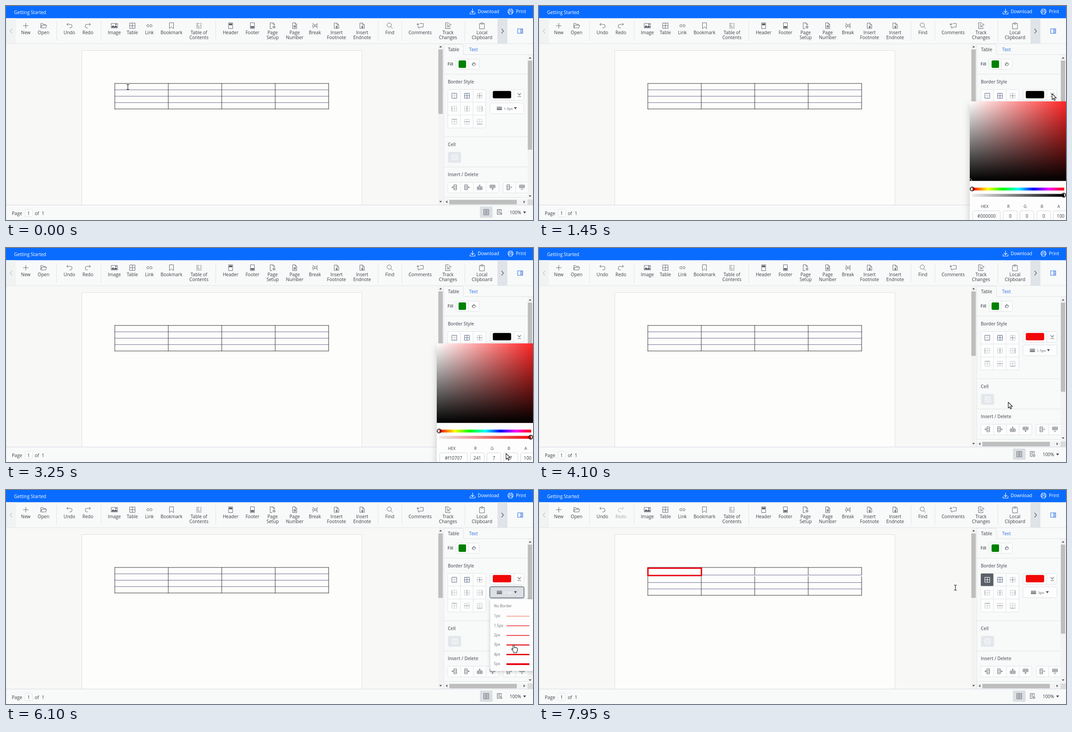
Write an HTML page that moves like this. It is 1172 px wide and 478 px high and loops after 8000 ms.

```html
<!DOCTYPE html>
<html lang="en">
<head>
<meta charset="utf-8">
<title>Table border editing</title>
<style>
  html, body { margin: 0; width: 100%; height: 100%; overflow: hidden; background: #f8f9f9; }
  svg { display: block; width: 1172px; height: 478px; }
  text { font-family: "Open Sans", "Noto Sans", sans-serif; font-size: 10.1px; fill: #3a3f45; white-space: pre; }
  .icon { fill: none; stroke: #5a6068; stroke-width: .95; }
  .solid { fill: #5a6068; stroke: none; }
  .bar { fill: #fff; }
  .head { font-weight: 600; fill: #666c72; font-size: 9.9px; }
  .box { fill: #fdfdfd; stroke: #dfe3e7; }
  .rule { stroke: #dfe3e6; fill: none; }
  .small { font-size: 8.3px; fill: #6f757b; }
</style>
</head>
<body>
<svg id="stage" viewBox="0 0 1172 478" xmlns="http://www.w3.org/2000/svg"></svg>
<script>
const LOOP = 8000, STEP = 50;
const stage = document.getElementById('stage');

function el(parent, name, attrs = {}, content) {
  const node = document.createElementNS('http://www.w3.org/2000/svg', name);
  for (const key in attrs) node.setAttribute(key, attrs[key]);
  if (content !== undefined) node.textContent = content;
  parent.appendChild(node);
  return node;
}
const group = (parent, attrs) => el(parent, 'g', attrs);
const rect = (parent, x, y, width, height, attrs) => el(parent, 'rect', { x, y, width, height, ...attrs });
const path = (parent, d, attrs) => el(parent, 'path', { d, ...attrs });
const label = (parent, x, y, text, attrs) => el(parent, 'text', { x, y, ...attrs }, text);
const centered = (parent, x, y, text, attrs) => label(parent, x, y, text, { 'text-anchor': 'middle', ...attrs });
const rule = (parent, d, attrs) => path(parent, d, { class: 'rule', ...attrs });

function icon(parent, x, y, d, solid) {
  const g = group(parent, { transform: `translate(${x} ${y})` });
  if (d) path(g, d, { class: 'icon' });
  if (solid) path(g, solid, { class: 'solid' });
  return g;
}
function gradient(id, colors, attrs) {
  const g = el(defs, 'linearGradient', { id, ...attrs });
  return colors.map(([color, alpha], i) => el(g, 'stop', {
    offset: i / (colors.length - 1), 'stop-color': color, 'stop-opacity': alpha }));
}
const show = (node, on) => node.setAttribute('display', on ? 'inline' : 'none');

const defs = el(stage, 'defs');

// Title bar
rect(stage, 0, 0, 1172, 478, { fill: '#f8f9f9' });
rect(stage, 0, 0, 1172, 27.3, { fill: '#0a6cfe' });
label(stage, 18, 17.5, 'Getting Started', { class: 'bar' });
label(stage, 1049, 16, 'Download', { class: 'bar' });
label(stage, 1134, 16, 'Print', { class: 'bar' });
path(stage, 'M1037.5 6V15M1034 11.5L1037.5 15L1041 11.5M1032 14V18H1043V14M1118.5 10V7H1125.5V10M1118.5 15H1116.5V10H1127.5V15H1125.5M1118.5 13H1125.5V18H1118.5Z',
  { fill: 'none', stroke: '#fff', 'stroke-width': 1.1 });

// Toolbar
const page = 'M1-6.5H-4.5V6.5H4.5V-3ZM1-6.5V-3H4.5';
const sheet = 'M-4.5-6.5H4.5V6.5H-4.5Z';
const note = 'M-2 6H-5V-6H1L5-2V6H3M1-6V-2H5M-1 1H2V6H-1ZM.5 1V6';
const tools = [
  [44, 'New', 'M0-6V6M-6 0H6'],
  [83.5, 'Open', 'M-6 5V-5H-2L-.5-3H4V-1M-6 5L-4-1H7L5 5Z'],
  [141, 'Undo', 'M-3-6L-6-3L-3 0M-6-3H2A4 4 0 0 1 2 5H0'],
  [182, 'Redo', 'M3-6L6-3L3 0M6-3H-2A4 4 0 0 0-2 5H0'],
  [241, 'Image', 'M-7-5H7V5H-7Z', 'M-6 4V2L-3-1L0 2L3-1L6 2V4ZM2-4H5V-2H2Z'],
  [281, 'Table', 'M-6-6H6V6H-6ZM0-6V6M-6 0H6'],
  [319, 'Link', 'M-1-2.5H-3.5A2.5 2.5 0 0 0-3.5 2.5H-1M1-2.5H3.5A2.5 2.5 0 0 1 3.5 2.5H1M-3 0H3'],
  [368, 'Bookmark', 'M-4.5-6.5H4.5V6.5L0 2.5L-4.5 6.5Z'],
  [429, 'Table of|Contents', 'M-6-5H1M3-5H6M-6-1.5H-1M3-1.5H6M-6 1.5H1M3 1.5H6M-6 5H6'],
  [499.5, 'Header', sheet, 'M-3.5-5H3.5V-1H-3.5Z'],
  [548, 'Footer', sheet, 'M-3.5 1H3.5V5H-3.5Z'],
  [593, 'Page|Setup', 'M1-6.5H-5.5V6.5H-1M1-6.5V-3H4.5M1-6.5L4.5-3V-1M.5 3A2.5 2.5 0 1 0 5.5 3A2.5 2.5 0 1 0 .5 3', 'M2 3A1 1 0 1 0 4 3A1 1 0 1 0 2 3'],
  [642, 'Page|Number', page + 'M-1-1V4.5M1.5-1V4.5M-2.5.5H3M-2.5 3H3'],
  [687, 'Break', 'M-4-6V-3L-1-2H5V-6M-4 6V2H5V6M-6-1L-4 0L-6 1M-2 0H1M3 0H6'],
  [735, 'Insert|Footnote', note],
  [792, 'Insert|Endnote', note],
  [853.5, 'Find', 'M3.5-1.5A4.7 4.7 0 1 1-5.9-1.5A4.7 4.7 0 1 1 3.5-1.5M2 2L6.5 6.5'],
  [921, 'Comments', 'M-1-5H7V3H0L-3 6V3H-5V1M-5-6V0M-8-3H-2'],
  [983, 'Track|Changes', 'M1-6.5H-5.5V6.5H4.5V4M1-6.5L4-3.5M-3-3H0M-3 0H0M-3 3H-1M0 3L1 0L5-4L7-2L3 2Z'],
  [1058.5, 'Local|Clipboard', 'M-2-5H-5.5V7H5.5V-5H2M-2-6.5H2V-3.5H-2Z']
];
rect(stage, 0, 27.3, 22, 56.7, { fill: '#f1f3f3' });
rect(stage, 1093, 27.3, 22, 56.7, { fill: '#dfe4e9' });
let redo;
for (const [x, name, d, solid] of tools) {
  const g = group(stage);
  icon(g, x, 44, d, solid);
  name.split('|').forEach((line, i) => centered(g, x, 62.6 + i * 11.8, line));
  if (name === 'Redo') redo = g;
}
for (const x of [112.5, 211.5, 466.5, 827.5, 880.5, 1020.5]) rule(stage, `M${x} 34V78`);
path(stage, 'M13.5 51L9 56L13.5 61', { fill: 'none', stroke: '#bfc4c9', 'stroke-width': 1.2 });
path(stage, 'M1102 51L1106.5 56L1102 61', { fill: 'none', stroke: '#555b61', 'stroke-width': 1.2 });
path(stage, 'M1138 51H1149V61H1138ZM1145 51V61', { fill: 'none', stroke: '#2f72e4', 'stroke-width': 1.1 });
path(stage, 'M1145 51H1149V61H1145Z', { fill: '#2f72e4', 'fill-opacity': .3 });

// Document
rect(stage, 0, 84, 961, 360, { fill: '#f8f8f7' });
rule(stage, 'M0 84H1172M.5 28V478');
path(stage, 'M168.5 444V99.5H791.5V444', { fill: '#fdfdfc', stroke: '#dcdee0' });

const inner = '#66668c', dark = '#303030';
function grid(rows, spans) {
  const g = group(stage);
  rows.forEach((y, i) => path(g, `M241.5 ${y}H718`, { stroke: i && i < 4 ? inner : dark }));
  for (let i = 0; i < 5; i++)
    for (const [a, b] of spans) path(g, `M${242 + i * 118.9} ${a}V${b}`, { stroke: dark });
  return g;
}
const plainTable = grid([0, 1, 2, 3, 4].map(i => 173 + i * 14.25), [[172.5, 230.5]]);
const redTable = grid([173, 190, 206.7, 221, 235.2], [[172.5, 190], [193, 235.5]]);
rect(redTable, 242.2, 174.5, 119, 16.5, { fill: '#fdfdfc', stroke: '#e8000b', 'stroke-width': 3 });

// Scroll bars
const arrow = (x, y, d) => path(stage, d, { transform: `translate(${x} ${y})`, fill: '#555' });
const up = 'M-3 1.5L0-2L3 1.5Z', down = 'M-3-1.5L0 2L3-1.5Z';
rect(stage, 961, 85, 11, 359, { fill: '#f3f3f4' });
rect(stage, 961.5, 97, 10, 144, { fill: '#bebebe' });
arrow(966.5, 91, up);
arrow(966.5, 437, down);

// Properties panel
rect(stage, 973, 85, 199, 359, { fill: '#f8f9f9' });
rule(stage, 'M973.5 85V444M1017 108.5H1172M974 85.5H1014Q1017.5 85.5 1017.5 89V108');
label(stage, 983, 100.5, 'Table');
label(stage, 1030, 101, 'Text', { style: 'fill:#2a6fe0' });
label(stage, 982, 132.5, 'Fill', { class: 'head', style: 'font-size:9.2px;fill:#444a50' });
rect(stage, 1000.5, 118.5, 52, 23, { class: 'box', rx: 3 });
rule(stage, 'M1028.5 119V141M974 152H1160M974 292H1160M974 359.5H1160M974 427.5H1160');
rect(stage, 1006.5, 121.6, 16.6, 16.6, { rx: 2.5, fill: '#008000' });
icon(stage, 1041, 130, 'M-4-1L0-4L4 0L0 4L-3 2ZM-4-1H3M-4-1V3M-1-3V-5');
label(stage, 982.5, 172.7, 'Border Style', { class: 'head' });
label(stage, 982.5, 312.7, 'Cell', { class: 'head' });
label(stage, 982.5, 380, 'Insert / Delete', { class: 'head' });

rect(stage, 982.5, 186.5, 84.5, 86, { class: 'box', rx: 3 });
rule(stage, 'M1010.7 187V272M1038.8 187V272M983 214.5H1067M983 243.5H1067');
const outline = 'M-5.5-5.5H5.5V5.5H-5.5Z', cross = 'M0-5.5V5.5M-5.5 0H5.5';
// Strong strokes of the nine border kinds, row by row
const strong = [outline, outline + cross, cross, 'M-5.5-5.5V5.5', 'M0-5.5V5.5', 'M5.5-5.5V5.5',
  'M-5.5-5.5H5.5', 'M-5.5 0H5.5', 'M-5.5 5.5H5.5'];
strong.forEach((d, i) => {
  const g = icon(stage, 997 + i % 3 * 28.2, 200.5 + Math.floor(i / 3) * 29, outline + cross);
  g.firstChild.setAttribute('style', 'stroke:#c9cdd1');
  path(g, d, { class: 'icon', style: i < 2 ? 'stroke:#60718c' : 'stroke:#858d96' });
});
const pressed = group(stage);
const pressedRing = rect(pressed, 982.5, 186.5, 29, 28, { fill: 'none', stroke: '#c3c7cc', 'stroke-width': 3.5, rx: 2 });
rect(pressed, 982.5, 186.5, 28, 28, { fill: '#5a6068', rx: 2 });
path(pressed, outline + cross, { transform: 'translate(997 200.5)', fill: 'none', stroke: '#fff', 'stroke-width': 1.1 });

rect(stage, 1076.5, 186.5, 75, 24, { class: 'box', rx: 3 });
rule(stage, 'M1129.5 187V210');
const swatch = rect(stage, 1082.6, 189.7, 40.8, 16.6, { rx: 3 });
icon(stage, 1141.5, 198, 'M-4-4L0 2L4-4M-4 4.5H4M-2-1H2');

const widthRing = rect(stage, 1076.5, 216.5, 75, 24, { fill: 'none', stroke: '#a9b0b8', 'stroke-width': 4, rx: 3.5 });
const widthBox = rect(stage, 1076.5, 216.5, 75, 24, { rx: 3 });
const widthIcon = path(stage, 'M0 225H11.5V226H0ZM0 227.3H11.5V229H0ZM0 230H11.5V232.3H0Z', { fill: '#5a6068' });
const widthLabel = label(stage, 0, 231.6, '', { class: 'small', style: 'font-size:8px' });
const widthCaret = path(stage, 'M-3.3 226H3.3L0 231Z', { fill: '#565c63' });

rect(stage, 983, 326, 29, 24, { fill: '#e3e7ec', rx: 3 });
path(stage, 'M992 332.5H1004V343.5H992ZM992 338H1004M996 332V336M1000 332V336M996 341H1001', { fill: 'none', stroke: '#fff' });

rect(stage, 982.5, 393.5, 113.5, 24, { class: 'box', rx: 3 });
path(stage, 'M1160 393.5H1108Q1105.5 393.5 1105.5 396V415Q1105.5 417.5 1108 417.5H1160', { class: 'box' });
rule(stage, 'M1011 394V417M1039.5 394V417M1068 394V417M1133.5 394V417');
const column = 'M-4-5.5H2V5.5H-4ZM-4-2H2M-4 2H2', row = 'M-5.5-5H5.5V1H-5.5ZM-2-5V1M2-5V1M-5.5-2H5.5';
icon(stage, 997, 405, 'M-1-5.5H5V5.5H-1ZM-1-2H5M-1 2H5M-6 0H-2M-4-2V2');
icon(stage, 1024, 405, column + 'M3 0H7M5-2V2');
icon(stage, 1053.5, 405, 'M-5.5 5H5.5V-1H-5.5ZM-2 5V-1M2 5V-1M-5.5 2H5.5M0-6V-2M-2-4H2');
icon(stage, 1082, 405, row + 'M0 2V6M-2 4H2');
icon(stage, 1118, 405, column + 'M4-1.5L7 1.5M7-1.5L4 1.5');
icon(stage, 1147.5, 405, row + 'M-1.5 3L1.5 6M1.5 3L-1.5 6');

rect(stage, 1160, 109, 12, 322, { fill: '#f3f3f4' });
rect(stage, 1160.5, 122, 9.7, 199, { fill: '#bebebe' });
rect(stage, 974, 432, 186, 12, { fill: '#f3f3f4' });
rect(stage, 1160, 432, 12, 12, { fill: '#dcdcdc' });
rect(stage, 986, 433, 150, 10, { fill: '#bebebe' });
arrow(1165.5, 116, up);
arrow(1165.5, 424.5, down);
arrow(980, 437.5, 'M1.5-3L-2 0L1.5 3Z');
arrow(1152.5, 437.5, 'M-1.5-3L2 0L-1.5 3Z');

// Status bar
rect(stage, 1, 444, 1171, 34, { fill: '#f8f9f9' });
rule(stage, 'M0 444.5H1172', { style: 'stroke:#d5d9e2' });
label(stage, 13, 466.5, 'Page');
rect(stage, 42.5, 454.5, 16, 16, { class: 'box', rx: 2 });
centered(stage, 50.5, 466.5, '1');
label(stage, 64, 466.5, 'of');
label(stage, 79.5, 466.5, '1');
rect(stage, 1054, 448, 28, 25, { fill: '#dbdfe4', rx: 2 });
icon(stage, 1068, 460.5, 'M-5.5-6H5.5V6H-5.5ZM-3.5-3.5H3.5M-3.5-1.2H3.5M-3.5 1.2H3.5M-3.5 3.5H3.5');
icon(stage, 1097, 460.5, 'M0 5H-4.5V-6H4.5V-1M-2.5-3.5H2.5M-2.5-1H1M-2.5 1.5H0M1 3A2.5 2.5 0 1 0 6 3A2.5 2.5 0 1 0 1 3M2 1L5 5');
label(stage, 1120, 465, '100%');
path(stage, 'M1150 459H1156.6L1153.3 463.5Z', { fill: '#444a50' });

// Line width list
const list = group(stage);
rect(list, 1077, 244, 110, 160, { fill: '#fdfdfd', style: 'filter:drop-shadow(0 2px 4px #0003)' });
label(list, 1085, 262.3, 'No Border', { class: 'small' });
[1, 1.5, 2, 3, 4, 5].forEach((size, i) => {
  const y = 281.3 + i * 21.4;
  label(list, 1085, y + 2.9, size + 'px', { class: 'small' });
  path(list, `M1113 ${y + .6}H1164`, { stroke: i ? '#e50914' : '#ee4a38', 'stroke-width': Math.max(.9, size * .8) });
});

// Colour picker
const picker = group(stage);
rect(picker, 958, 213, 260, 290, { fill: '#fdfdfd', style: 'filter:drop-shadow(0 8px 8px #0003)' });
gradient('saturation', [['#fff', 1], ['#f00', 1]], { gradientUnits: 'userSpaceOnUse', x1: 958, x2: 1210 });
gradient('value', [['#000', 0], ['#000', 1]], { x2: 0, y2: 1 });
gradient('hue', ['#f00', '#ff0', '#0f0', '#0ff', '#00f', '#f0f', '#f00'].map(c => [c, 1]));
const alphaStops = gradient('alpha', [['#000', 0], ['#000', 1]]);
const checks = el(defs, 'pattern', { id: 'checks', width: 4, height: 4, patternUnits: 'userSpaceOnUse' });
path(checks, 'M0 0H2V4H4V2H0Z', { fill: '#d9d9d9' });
for (const id of ['saturation', 'value']) rect(picker, 958, 213, 214, 177.6, { fill: `url(#${id})` });
const areaKnob = path(picker, 'M958 386A5 5 0 0 1 962.5 391', { fill: 'none', stroke: '#ccc', 'stroke-width': 1.2 });
rect(picker, 964, 405.7, 204, 6.4, { fill: 'url(#hue)' });
for (const id of ['checks', 'alpha']) rect(picker, 964, 419.7, 204, 6.4, { fill: `url(#${id})` });
for (const [cx, cy] of [[963.3, 408.7], [1167, 422.5]])
  el(picker, 'circle', { cx, cy, r: 4.3, fill: 'none', stroke: '#111', 'stroke-width': 1.7 });
const fields = [['HEX', 964.5, 61.5], ['R', 1032.5, 31], ['G', 1069.5, 31], ['B', 1107, 31], ['A', 1144.5, 31]]
  .map(([name, x, w]) => {
    const mid = x + w / 2;
    centered(picker, mid - 4, 451, name, { style: 'font-size:9.1px' });
    rect(picker, x, 457.5, w, 30, { class: 'box', rx: 3, style: 'stroke:#d3d8de' });
    return centered(picker, mid, 473, '', { style: 'font-size:10px' });
  });

// Pointers, hot spot at the origin
const pointers = {
  beam: 'M-3-5.5H-1Q0-5.5 0-4.5Q0-5.5 1-5.5H3M0-4.5V4.5M-3 5.5H-1Q0 5.5 0 4.5Q0 5.5 1 5.5H3',
  arrow: 'M0 0V13L3 10.2L5 15L7.2 14L5.2 9.5H9.5Z',
  hand: 'M-1.5 10V1.5Q-1.5 0 0 0Q1.5 0 1.5 1.5V6Q2.5 5 4 6.2Q5.2 5.4 6.3 6.8Q8.5 6.5 8.5 8.5V12Q8.5 14 7 15V17.5H0V15.5L-4.3 10Q-5 8.2-3.5 8.2Q-2.5 8.4-1.5 10Z'
};
for (const kind in pointers) {
  pointers[kind] = path(stage, pointers[kind], {
    fill: kind === 'beam' ? 'none' : '#fff', stroke: '#111', 'stroke-width': 1.1, 'stroke-linejoin': 'round' });
}

// Pointer stops: time, x, y
const stops = [
  [0, 271, 181], [100, 271, 181], [800, 1106, 227], [950, 1106, 227], [1250, 1141, 196], [1450, 1141, 196],
  [1900, 1190, 240], [2850, 1190, 250], [3250, 1112, 459], [3450, 1090, 490], [3900, 1090, 490],
  [4300, 997, 199], [4500, 997, 199], [4850, 1126, 231], [5350, 1126, 231], [6000, 1129, 346],
  [6400, 1129, 346], [7000, 997, 199], [7350, 997, 199], [7900, 926, 218], [LOOP, 926, 218]
];
const at = { pickerOpen: 1400, recolor: 2500, apply: 3650, border: 4400, listOpen: 5250, choose: 6350, reborder: 7200 };

function pointerAt(t) {
  const i = stops.findIndex(s => s[0] > t);
  const [t0, x0, y0] = stops[i - 1], [t1, x1, y1] = stops[i];
  const p = (t - t0) / (t1 - t0), k = p * p * (3 - 2 * p);
  return [x0 + (x1 - x0) * k, y0 + (y1 - y0) * k];
}
const within = (x, y, l, t, r, b) => x >= l && x <= r && y >= t && y <= b;

function draw(t) {
  const [x, y] = pointerAt(t);
  const between = (a, b) => t >= a && t < b;
  const picking = between(at.pickerOpen, at.apply), listing = between(at.listOpen, at.choose);
  const chosen = t >= at.choose, done = t >= at.reborder;

  show(plainTable, !done);
  show(redTable, done);
  redo.setAttribute('opacity', done ? .45 : 1);
  show(picker, picking);
  show(list, listing);
  show(pressed, between(at.border, at.listOpen) || done);
  show(pressedRing, !done);
  swatch.setAttribute('fill', t >= at.apply ? '#f10707' : '#000');

  const over = !picking && within(x, y, 1077, 217, 1152, 241);
  const active = over || listing;
  show(widthRing, between(at.listOpen, at.reborder));
  widthBox.setAttribute('fill', active ? '#dce0e4' : '#fdfdfd');
  widthBox.setAttribute('stroke', active ? '#6c7580' : '#dfe3e7');
  widthLabel.textContent = chosen ? '3px' : '1.5px';
  widthLabel.style.fill = active ? '#fff' : '#5f656b';
  widthIcon.setAttribute('transform', `translate(${chosen ? 1094 : 1091.5} 0)`);
  widthLabel.setAttribute('x', chosen ? 1110 : 1107);
  widthCaret.setAttribute('transform', `translate(${chosen ? 1130.5 : 1133} 0)`);

  const recolored = t >= at.recolor;
  const values = recolored ? ['#f10707', 241, 7, 7, 100] : ['#000000', 0, 0, 0, 100];
  fields.forEach((field, i) => field.textContent = values[i]);
  alphaStops.forEach(stop => stop.setAttribute('stop-color', values[0]));
  show(areaKnob, !recolored);

  const onButton = over || (listing && within(x, y, 1077, 244, 1172, 404)) ||
    (!picking && (within(x, y, 983, 187, 1067, 273) || within(x, y, 1077, 187, 1152, 211)));
  const kind = x < 961 ? 'beam' : onButton ? 'hand' : 'arrow';
  for (const name in pointers) show(pointers[name], name === kind);
  pointers[kind].setAttribute('transform', `translate(${x.toFixed(1)} ${y.toFixed(1)})`);
}

const start = performance.now();
function tick() {
  const t = Math.max(0, performance.now() - start) % LOOP;
  draw(Math.floor(t / STEP) * STEP);
  requestAnimationFrame(tick);
}
tick();
</script>
</body>
</html>
```
